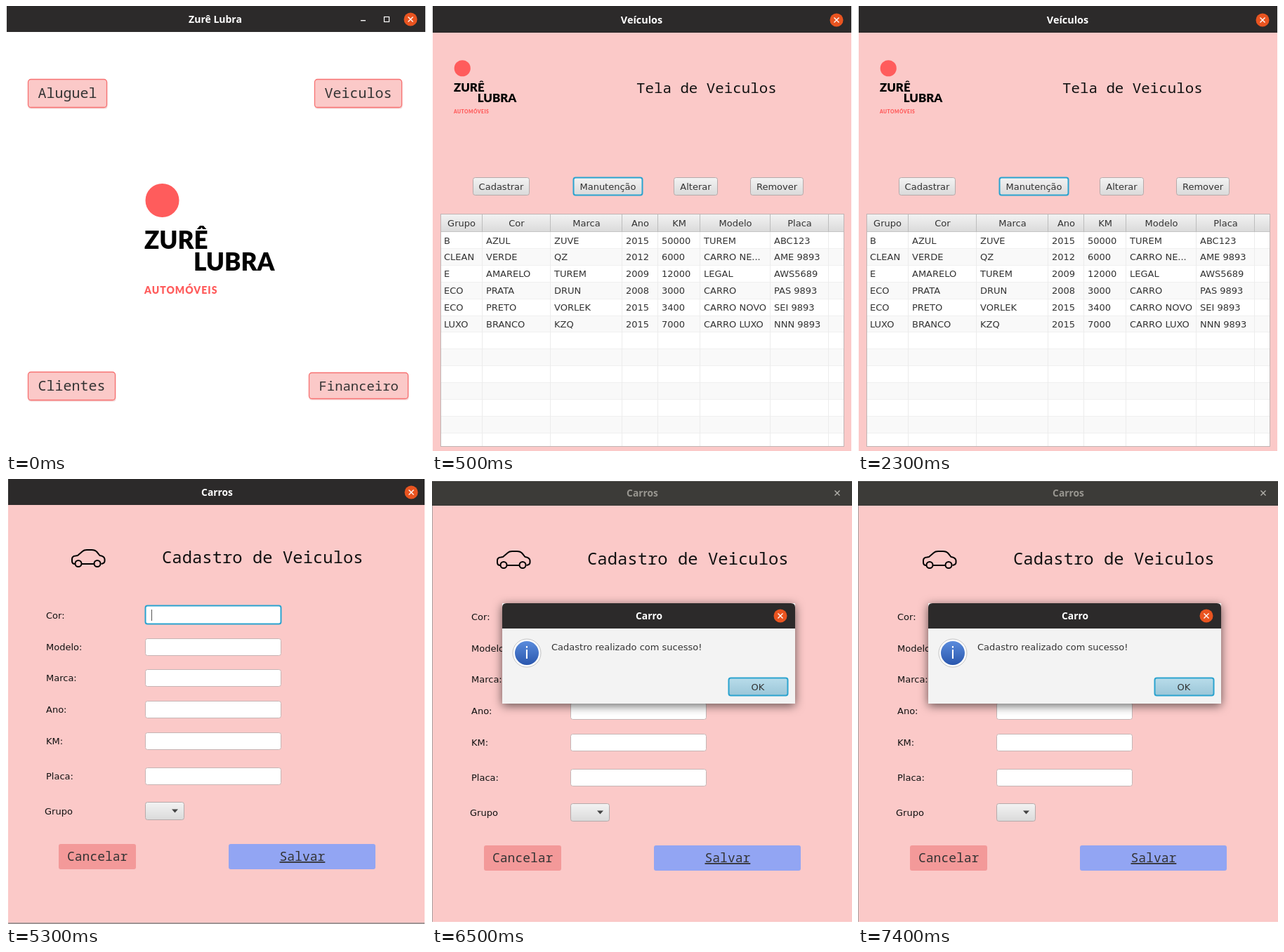
An HTML page for the animation above (8 s loop, 598 by 634 pixels).

```html
<!DOCTYPE html>
<html lang="pt">
<head>
<meta charset="utf-8">
<style>
  html, body { margin: 0; width: 100%; height: 100%; overflow: hidden; background: #fff; }
  svg { display: block; width: 598px; height: 634px; font: 13px "DejaVu Sans", sans-serif; fill: #333; }
  .mono { font-family: "Noto Sans Mono", monospace; }
  .title { font-family: "Noto Sans", sans-serif; font-weight: 700; }
  .brand { font-family: Lato, sans-serif; font-weight: 900; }
  .mid { text-anchor: middle; }
  .crisp { shape-rendering: crispEdges; }
</style>
</head>
<body>
<svg id="stage" viewBox="0 0 598 634"></svg>
<script>
const PINK = '#fbc9c8', DARK = '#2c2a2a', CORAL = '#ff5c5c', BLUE = '#2ba3cf';

const rect = (x, y, w, h, fill, extra = '') =>
  `<rect x="${x}" y="${y}" width="${w}" height="${h}" fill="${fill}" ${extra}/>`;
const box = (x, y, w, h, fill, stroke, width = 1, rx = 3) =>
  rect(x + .5, y + .5, w - 1, h - 1, fill, `stroke="${stroke}" stroke-width="${width}" rx="${rx}"`);
const text = (x, y, str, extra = '') => `<text x="${x}" y="${y}" ${extra}>${str}</text>`;
const mid = (x, y, str, extra = '') => text(x, y, str, `class="mid" ${extra}`);
const mono = (x, y, str, size, extra = '') =>
  text(x, y, str, `class="mono" font-size="${size}" ${extra}`);
const title = (x, y, str, size = 13.8, fill = '#fff') =>
  text(x, y, str, `class="title mid" font-size="${size}" fill="${fill}"`);
const cross = (x, y, color) =>
  `<path d="M${x - 3.5} ${y - 3.5}l7 7m0-7l-7 7" stroke="${color}" stroke-width="1.4"/>`;
const close = (x, y) => `<circle cx="${x}" cy="${y}" r="9.5" fill="#e95420"/>` + cross(x, y, '#fff');

const logo = `
  <circle cx="222.5" cy="277" r="24" fill="${CORAL}"/>
  <g class="brand" font-size="35" fill="#000">${text(197, 346, 'ZURÊ')}${text(267, 377, 'LUBRA')}</g>
  ${text(197, 410, 'AUTOMÓVEIS', `class="brand" font-size="14" letter-spacing="1" fill="${CORAL}"`)}`;

function home() {
  const button = (x, y, w, h, label, size) =>
    rect(x + .5, y + 1.5, w, h, '#e8b0b0', 'rx="4" opacity=".5"') +
    box(x, y, w, h, PINK, '#f77272', 1.3, 4) + mono(x + 14.5, y + h / 2 + 6.5, label, size);
  return rect(1, 0, 596, 37, DARK) + title(298, 24, 'Zurê Lubra', 14) +
    rect(505, 20, 7, 1.4, '#fff') + box(538, 15, 8, 8, 'none', '#fff', 1.2, 0) + close(576, 19) +
    button(31, 104, 113, 41, 'Aluguel', 20) + button(439, 104, 125, 41, 'Veiculos', 20) +
    button(31, 521, 125, 41, 'Clientes', 20) + button(431, 522, 142, 38, 'Financeiro', 18.9) + logo;
}

function vehicles() {
  const button = (x, w, label, focus) =>
    (focus ? box(x, 244, w, 26, 'url(#grey)', BLUE, 2) : box(x, 244, w, 26, 'url(#grey)', '#b5aaaa')) +
    mid(x + w / 2, 262, label);
  const edges = [12, 72, 169, 271, 322, 382, 482, 565, 587];
  const heads = ['Grupo', 'Cor', 'Marca', 'Ano', 'KM', 'Modelo', 'Placa'];
  const rows = [
    'B|AZUL|ZUVE|2015|50000|TUREM|ABC123',
    'CLEAN|VERDE|QZ|2012|6000|CARRO NE...|AME 9893',
    'E|AMARELO|TUREM|2009|12000|LEGAL|AWS5689',
    'ECO|PRATA|DRUN|2008|3000|CARRO|PAS 9893',
    'ECO|PRETO|VORLEK|2015|3400|CARRO NOVO|SEI 9893',
    'LUXO|BRANCO|KZQ|2015|7000|CARRO LUXO|NNN 9893'];
  const pitch = 23.9;
  let table = rect(12, 296, 575, 332, '#fff');
  for (let i = 0; i < 13; i++) {
    const y = 322 + i * pitch;
    if (i % 2) table += rect(12, y, 575, pitch, '#f9f9f9');
    table += rect(12, y + pitch - 1, 575, 1, '#f0f0f0');
  }
  table += rect(12, 296, 575, 26, 'url(#grey)') + rect(12, 321, 575, 1, '#c4c4c4');
  for (const x of edges.slice(1, 8))
    table += rect(x - 1, 296, 1, 26, '#bdbdbd') + rect(x - 1, 322, 1, 306, '#ececec');
  const labels = heads.map((h, i) => mid((edges[i] + edges[i + 1]) / 2, 314, h)).join('') +
    rows.map((row, r) => row.split('|').map((cell, c) =>
      text(edges[c] + 5, 338.5 + r * pitch, cell)).join('')).join('');
  return rect(1, 0, 596, 634, PINK) + rect(1, 0, 596, 38, DARK) +
    title(298.5, 25, 'Veículos', 14.4) + close(576, 20) +
    `<g transform="translate(-64 -44.8) scale(.482)">${logo}</g>` +
    mono(291, 124, 'Tela de Veiculos', 20.8, 'fill="#111"') +
    button(58, 81, 'Cadastrar') + button(201, 99, 'Manutenção', true) +
    button(344, 63, 'Alterar') + button(453, 76, 'Remover') +
    `<g class="crisp" clip-path="url(#table)">${table}</g>` +
    box(12, 296, 575, 332, 'none', '#c0b4b4', 1, 0) + labels;
}

function form() {
  const fields = [['Cor:', 194], ['Modelo:', 239], ['Marca:', 283], ['Ano:', 328.5], ['KM:', 373], ['Placa:', 423]];
  return `<g fill="none" stroke="#000" stroke-width="2" stroke-linejoin="round">
      <path d="M98 121q-4 0-4-4v-3q0-4 5-4.5l3-.5 7-6q2-2 6-2h7q5 0 7.5 3l4 5q6.5 1 7 5v3q0 3-5 4M108 121h17"/>
      <circle cx="103" cy="120.5" r="4.5"/><circle cx="130" cy="120.5" r="4.5"/></g>` +
    mono(222, 120, 'Cadastro de Veiculos', 23.9, 'fill="#111"') +
    fields.map(([label, y], i) => text(57, y + 4.5, label, 'fill="#111"') +
      (i ? box(198, Math.floor(y) - 12, 194, 25, '#fff', '#c6b5b5') : box(198, 180, 194, 27, '#fff', BLUE, 2))).join('') +
    rect(207, 186, 1, 16, '#555') + text(55, 477.5, 'Grupo', 'fill="#111"') +
    box(198, 460, 56, 26, 'url(#grey)', '#b5aaaa') + '<path d="M236 470.5h9l-4.5 5z" fill="#444"/>' +
    rect(75, 520, 110, 36, '#f39999', 'rx="3"') + mono(87, 544, 'Cancelar', 18) +
    rect(317, 520, 209, 36, '#92a5f3', 'rx="3"') +
    mono(389.5, 544, 'Salvar', 18, 'text-decoration="underline"');
}

const register = () => rect(3, 0, 593, 634, PINK) + rect(3, 0, 593, 37, DARK) +
  rect(3, 632, 593, 2, '#a09696') + title(300.5, 24, 'Carros') + close(577, 19) + form();

const success = () => rect(0, 3, 598, 628, PINK) + rect(0, 3, 598, 35, '#3c3b38') +
  rect(0, 38, 1, 593, '#aaa0a0') + title(299.5, 25, 'Carros', 13.8, '#989690') + cross(577, 20, '#b5b3ad') +
  `<g transform="translate(-1 2)">${form()}</g>` +
  rect(100, 177, 417, 143, '#f3f3f3', 'style="filter:drop-shadow(0 3px 7px #0009)"') +
  `<path d="M100 213v-30q0-6 6-6h405q6 0 6 6v30z" fill="${DARK}"/>` +
  title(309, 200, 'Carro') + close(496, 195) +
  `<circle cx="135" cy="248" r="20" fill="#fff" stroke="#c4c4c4"/><circle cx="135" cy="248" r="17" fill="url(#info)"/>` +
  mid(135, 256, 'i', 'font-size="23" fill="#fff"') +
  text(170, 244, 'Cadastro realizado com sucesso!') +
  box(422, 283, 85, 26, 'url(#ok)', BLUE, 2) + mid(464, 300.5, 'OK');

const gradient = (id, top, bottom) => `<linearGradient id="${id}" x2="0" y2="1">
  <stop stop-color="${top}"/><stop offset="1" stop-color="${bottom}"/></linearGradient>`;
const scenes = [[0, home], [500, vehicles], [3500, register], [6500, success]];

const stage = document.getElementById('stage');
stage.innerHTML = `<defs>${gradient('grey', '#f3f3f3', '#dadada')}${gradient('ok', '#b9dcea', '#9ac6d8')}
  ${gradient('info', '#5a8bdc', '#2a57ad')}
  <clipPath id="table"><rect x="12" y="296" width="575" height="332"/></clipPath></defs>` +
  scenes.map(([, draw]) => `<g class="scene" visibility="hidden">${draw()}</g>`).join('');
const layers = stage.querySelectorAll('.scene');

function tick() {
  const t = performance.now() % 8000;
  const current = scenes.filter(([start]) => t >= start).length - 1;
  layers.forEach((layer, i) => layer.setAttribute('visibility', i === current ? 'visible' : 'hidden'));
  requestAnimationFrame(tick);
}
tick();
</script>
</body>
</html>
```
